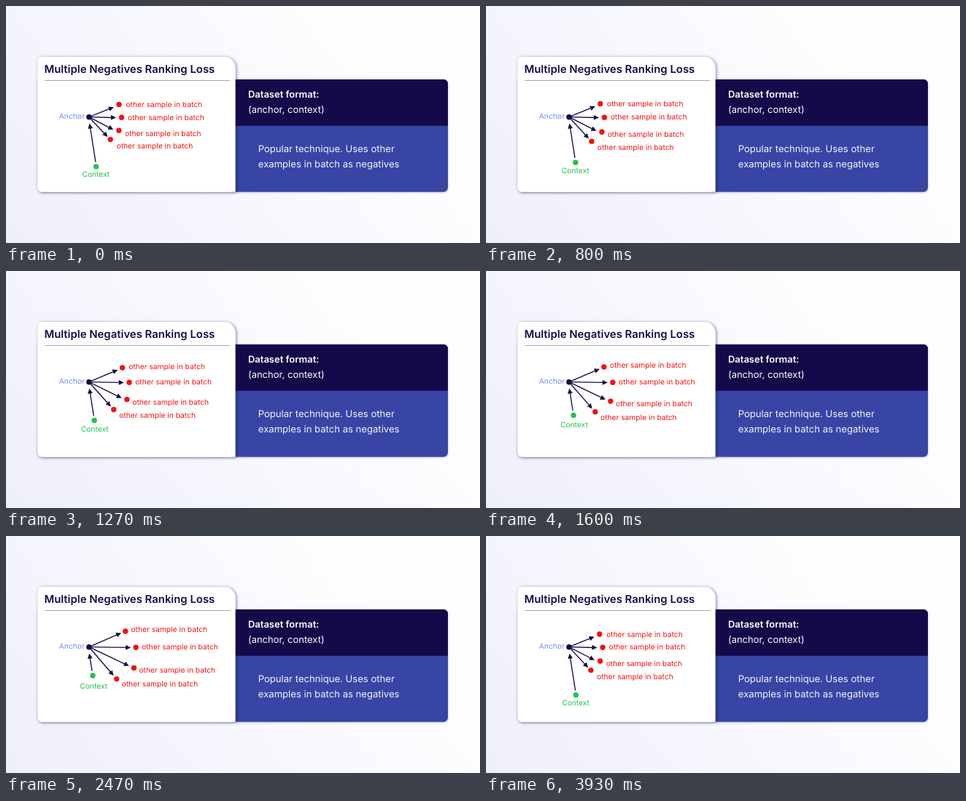
Write an HTML page that moves like this. It is 650 by 326 pixels and loops after 4000 ms.

```html
<!DOCTYPE html>
<html lang="en">
<head>
<meta charset="utf-8">
<title>Multiple Negatives Ranking Loss</title>
<style>
  html, body { margin: 0; width: 100%; height: 100%; overflow: hidden; }
  svg { display: block; width: 100%; height: 100%; font-family: Inter, sans-serif; }
  text { text-rendering: geometricPrecision; }
  .title { font-size: 14.9px; font-weight: 600; fill: #140a49; }
  .head { font-size: 13px; font-weight: 600; fill: #fff; }
  .format { font-size: 13px; fill: #fff; }
  .body { font-size: 13.1px; fill: #f4f4fc; }
  .label { font-size: 10.25px; }
</style>
</head>
<body>
<svg id="stage" viewBox="0 0 650 326" xmlns="http://www.w3.org/2000/svg">
  <defs>
    <linearGradient id="bg" gradientUnits="userSpaceOnUse" x1="0" y1="326" x2="420" y2="0">
      <stop offset="0" stop-color="#eeeffb"/>
      <stop offset="1" stop-color="#fdfdff"/>
    </linearGradient>
    <filter id="panelShadow" x="-10%" y="-10%" width="120%" height="120%">
      <feDropShadow dx="0" dy="0.5" stdDeviation="1.6" flood-color="#140a49" flood-opacity="0.28"/>
    </filter>
    <filter id="cardShadow" x="-10%" y="-10%" width="120%" height="120%">
      <feDropShadow dx="1.5" dy="0.8" stdDeviation="2" flood-color="#140a49" flood-opacity="0.5"/>
    </filter>
  </defs>
  <rect width="650" height="326" fill="url(#bg)"/>
  <g filter="url(#panelShadow)">
    <rect x="43.5" y="101" width="300" height="154.7" rx="6" fill="#fff"/>
    <path d="M310 101H600a6 6 0 0 1 6 6V249.7a6 6 0 0 1-6 6H310Z" fill="#3844a4"/>
  </g>
  <path d="M310 101H600a6 6 0 0 1 6 6V164.7H310Z" fill="#140a49"/>
  <path d="M49.5 70H299.5a15 15 0 0 1 15 15V255.7H49.5a6 6 0 0 1-6-6V76a6 6 0 0 1 6-6Z" fill="#fff" filter="url(#cardShadow)"/>
  <path d="M53 102.5H307.5" stroke="#a5a2c0"/>
  <text class="title" x="52.4" y="92.3">Multiple Negatives Ranking Loss</text>
  <text class="head" x="331.9" y="125.8">Dataset format:</text>
  <text class="format" x="331.9" y="146.6">(anchor, context)</text>
  <text class="body" x="345.7" y="200.6">Popular technique. Uses other</text>
  <text class="body" x="345.8" y="221.5">examples in batch as negatives</text>
  <g id="graph"></g>
</svg>
<script>
const NAVY = "#140a49", RED = "#f01414", GREEN = "#27c24a";
const LOOP = 4000, FPS = 15, CYCLE = 51, MOVE = 2.45;
const graph = document.getElementById("graph");

function add(tag, attrs, text = "") {
  const el = document.createElementNS("http://www.w3.org/2000/svg", tag);
  set(el, attrs);
  el.textContent = text;
  graph.appendChild(el);
  return el;
}

function set(el, attrs) {
  for (const key in attrs) el.setAttribute(key, attrs[key]);
}

// Each pair holds the first and the settled position.
const anchor = [113.8, 152.7];
const sample = "other sample in batch";
const nodes = [
  { color: RED, text: sample, dot: [[155, 135.4], [163.7, 131]],
    label: [[164.4, 139.2], [171.4, 131.7]], tail: [anchor, anchor], tip: [[147.8, 139], [158, 133.4]] },
  { color: RED, text: sample, dot: [[158.5, 153.2], [178.2, 153.3]],
    label: [[167, 156.5], [186.1, 156.4]], tail: [anchor, anchor], tip: [[150.9, 153.6], [171.2, 153.4]] },
  { color: RED, text: sample, dot: [[154.9, 171.2], [175.4, 181.4]],
    label: [[162.9, 178.5], [182.4, 188]], tail: [anchor, anchor], tip: [[147.2, 170.1], [168.7, 178.8]] },
  { color: RED, text: sample, dot: [[143.2, 183.6], [151.7, 196.6]],
    label: [[151.5, 196], [158.5, 207]], tail: [anchor, anchor], tip: [[139.4, 180.1], [147.6, 192.1]] },
  { color: GREEN, text: "Context", dot: [[123.6, 220.9], [119, 192]],
    label: [[104.4, 234.5], [101.2, 209.6]], tail: [[122.9, 214.6], [118, 185.5]], tip: [[114.6, 161.5], [114.2, 161.5]] }
];

for (const n of nodes) {
  n.line = add("path", { stroke: NAVY, "stroke-width": 1.35 });
  n.arrow = add("path", { fill: NAVY, d: "M0 0L-7-3.4V3.4Z" });
  n.circle = add("circle", { r: 3.7, fill: n.color });
  n.name = add("text", { class: "label", fill: n.color }, n.text);
}
add("circle", { cx: anchor[0], cy: anchor[1], r: 3.7, fill: NAVY });
add("text", { class: "label", x: 72.8, y: 154.6, fill: "#6e8ef0" }, "Anchor");

// Cubic Bezier easing (0.5, 0, 0.5, 1).
function ease(x) {
  if (x >= 1) return 1;
  let lo = 0, hi = 1;
  for (let i = 0; i < 24; i++) {
    const s = (lo + hi) / 2;
    if (1.5 * s * (1 - s) + s ** 3 < x) lo = s; else hi = s;
  }
  return lo * lo * (3 - 2 * lo);
}

function draw(ms) {
  const step = Math.floor((ms % LOOP + 3.4) * FPS / 1000) % CYCLE;
  const p = ease(step / FPS / MOVE);
  const at = ([a, b]) => a.map((v, i) => v + (b[i] - v) * p);
  for (const n of nodes) {
    const [cx, cy] = at(n.dot), [x, y] = at(n.label);
    const [sx, sy] = at(n.tail), [tx, ty] = at(n.tip);
    const angle = Math.atan2(ty - sy, tx - sx);
    const ex = tx - 5 * Math.cos(angle), ey = ty - 5 * Math.sin(angle);
    set(n.circle, { cx, cy });
    set(n.name, { x, y });
    set(n.line, { d: `M${sx} ${sy}L${ex} ${ey}` });
    set(n.arrow, { transform: `translate(${tx} ${ty}) rotate(${angle * 180 / Math.PI})` });
  }
}

let start;
function tick(now) {
  start ??= now;
  draw(now - start);
  requestAnimationFrame(tick);
}
draw(0);
requestAnimationFrame(tick);
</script>
</body>
</html>
```
